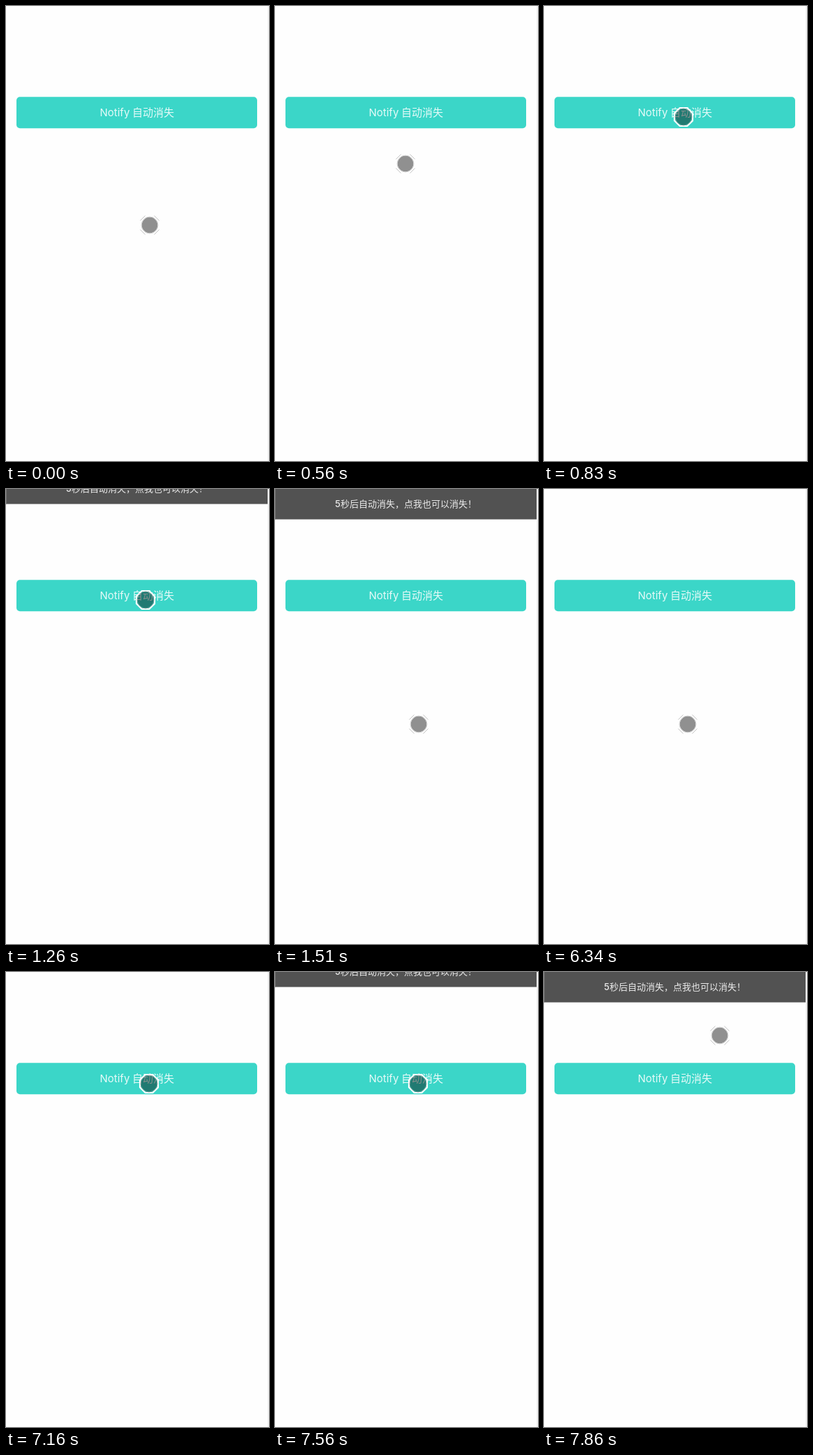
Write an HTML page with a canvas that moves like this. It is 377x652 px and loops after 7990 ms.

```html
<!DOCTYPE html>
<html lang="zh-CN">
<head>
<meta charset="utf-8">
<title>Notify</title>
<style>
html, body { margin: 0; width: 100%; height: 100%; overflow: hidden; background: #fefefe; }
canvas { display: block; }
</style>
</head>
<body>
<canvas id="stage" width="377" height="652"></canvas>
<script>
const ctx = document.getElementById('stage').getContext('2d');
const LOOP = 7990;
const BAR_HEIGHT = 43.5;
const FONT = 'Inter, "Noto Sans CJK SC", "Noto Sans CJK", sans-serif';

// Progress 0..1 in equal jumps: the first at start, the last at end
function stepped(t, start, end, count) {
  const jump = Math.floor((t - start) / (end - start) * (count - 1) + 0.03) + 1;
  return Math.min(Math.max(jump, 0), count) / count;
}

// Quadratic curve from a to b, bent towards c
const curve = (a, c, b, u) =>
  a.map((v, i) => (1 - u) ** 2 * v + 2 * u * (1 - u) * c[i] + u * u * b[i]);

function pointerAt(t) {
  const rest = [206, 314], firstTap = [200, 159], waiting = [206, 337], secondTap = [205, 160];
  if (t < 1380) return curve(rest, [171, 216], firstTap, stepped(t, 430, 830, 4));
  if (t < 6700) return curve(firstTap, [203, 248], waiting, stepped(t, 1385, 1510, 2));
  if (t < 7860) return curve(waiting, [172, 182], secondTap, stepped(t, 6740, 7160, 4));
  return [252, 91];
}

// How far the bar is shown, 0..1
function barShown(t) {
  if (t < 6000) return stepped(t, 1260, 1385, 2);
  if (t < 7500) return 1 - stepped(t, 6220, 6340, 2) ** 6;
  return stepped(t, 7560, 7710, 2);
}

function rect(x, y, w, h, color) {
  ctx.fillStyle = color;
  ctx.fillRect(x, y, w, h);
}

function text(str, x, y, font, color) {
  ctx.font = `${font} ${FONT}`;
  ctx.fillStyle = color;
  ctx.fillText(str, x, y);
}

function circle(radius) {
  ctx.beginPath();
  ctx.arc(0, 0, radius, 0, Math.PI * 2);
}

function stroke(color, width) {
  ctx.strokeStyle = color;
  ctx.lineWidth = width;
  ctx.stroke();
}

function octagon(apothem) {
  ctx.beginPath();
  for (let i = 0; i < 8; i++) {
    const angle = (i + 0.5) * Math.PI / 4, r = apothem / Math.cos(Math.PI / 8);
    ctx.lineTo(r * Math.cos(angle), r * Math.sin(angle));
  }
  ctx.closePath();
}

function drawButton() {
  ctx.fillStyle = '#3bd6c8';
  ctx.beginPath();
  ctx.roundRect(15, 130.2, 345, 45, 5);
  ctx.fill();
  text('Notify', 134.5, 158, '400 15px', '#e6faf8');
  text('自动消失', 181, 158, '400 15px', '#e6faf8');
}

function drawBar(shown) {
  const offset = (shown - 1) * BAR_HEIGHT;
  if (!shown) return;
  rect(0, 0, 375, Math.round(BAR_HEIGHT + offset) - 0.5, '#525252');
  rect(0, 0, 0.6, BAR_HEIGHT + offset, '#888');
  text('5', 86, 26 + offset, '500 13px', '#ebebeb');
  text('秒后自动消失，点我也可以消失！', 94, 26 + offset, '500 13px', '#ebebeb');
}

function drawPointer([x, y]) {
  const overButton = y > 130 && y < 175;
  ctx.save();
  ctx.translate(Math.round(x), Math.round(y));
  octagon(13);
  stroke('#fff', 2.2);
  circle(11.4);
  ctx.fillStyle = 'rgba(0,0,0,.43)';
  ctx.fill();
  circle(12);
  stroke(overButton ? 'rgba(110,125,122,.8)' : '#d0d0d0', 0.9);

  // Faint marks on the cut corners
  if (!overButton) {
    ctx.beginPath();
    for (const sx of [-1, 1]) for (const sy of [-1, 1]) {
      ctx.moveTo(sx * 13.5, sy * 6.5);
      ctx.lineTo(sx * 6.5, sy * 13.5);
    }
    stroke('#aaa', 0.7);
  }
  ctx.restore();
}

function draw(t) {
  rect(0, 0, 377, 652, '#fefefe');
  rect(375, 0, 2, 652, '#f2f2f2');
  drawButton();
  drawBar(barShown(t));
  drawPointer(pointerAt(t));
}

const start = performance.now();
function frame() {
  draw((performance.now() - start) % LOOP);
  requestAnimationFrame(frame);
}
frame();
</script>
</body>
</html>
```
